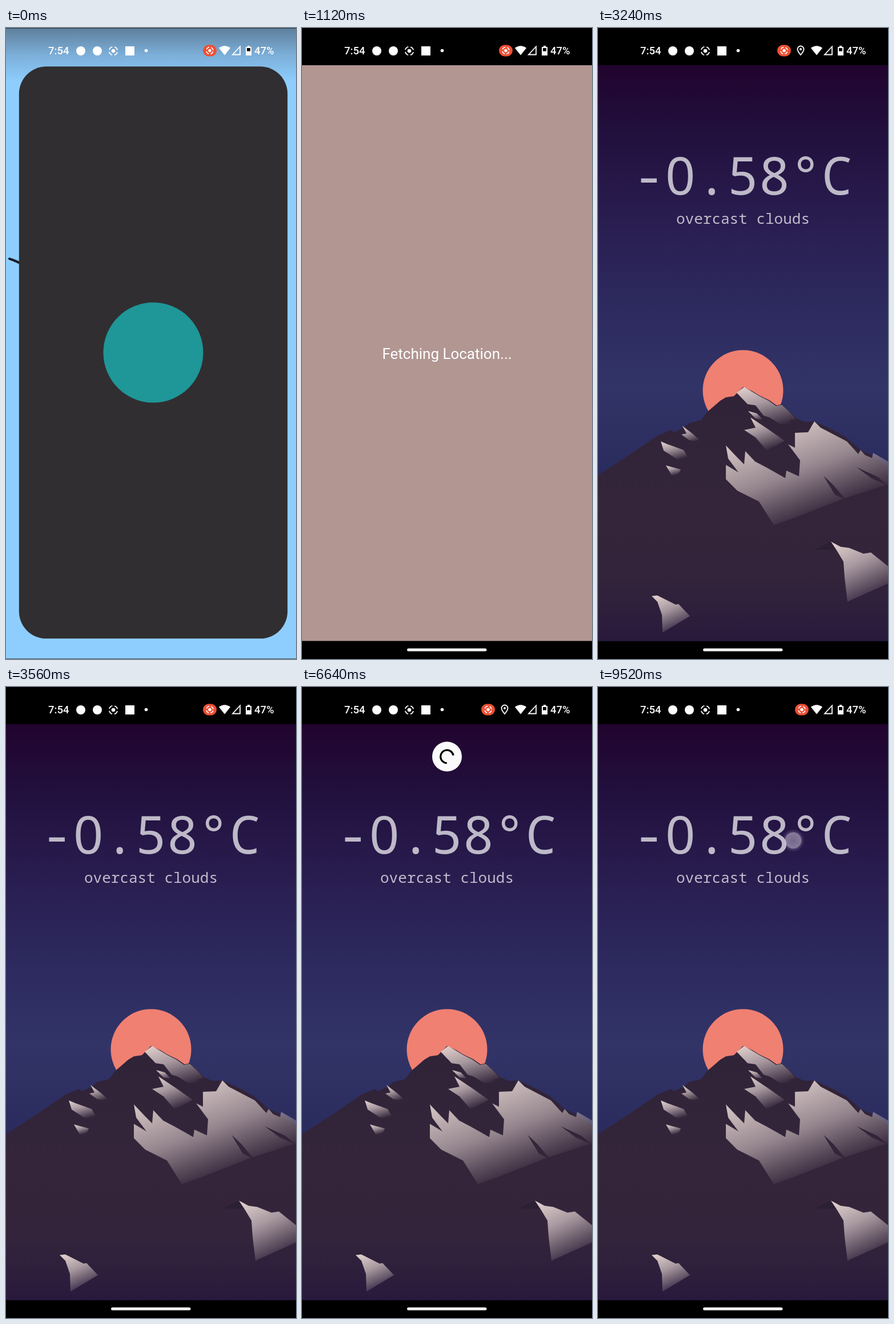
These frames come from a looping animation (508 by 1102 pixels, 9560 ms). An HTML page:

```html
<!DOCTYPE html>
<html lang="en">
<head>
<meta charset="utf-8">
<title>Weather app</title>
<style>
html, body { margin: 0; width: 100%; height: 100%; overflow: hidden; background: #000; }
svg { display: block; }
text { fill: #fff; font-family: Roboto, sans-serif; }
.mono { font-family: "Noto Sans Mono", monospace; fill-opacity: .7; }
.bar { font-size: 18.5px; font-weight: 500; }
.line { fill: none; stroke: #fff; stroke-width: 1.8; }
</style>
</head>
<body>
<svg width="508" height="1102" viewBox="0 0 508 1102">
  <defs>
    <linearGradient id="shade" x2="0" y2="1">
      <stop stop-color="#5f7f9c"/><stop offset=".5" stop-color="#7cafd9"/><stop offset="1" stop-color="#8eceff"/>
    </linearGradient>
    <linearGradient id="night" gradientUnits="userSpaceOnUse" x1="0" y1="65" x2="0" y2="790">
      <stop stop-color="#21042e"/><stop offset=".18" stop-color="#22113f"/>
      <stop offset=".4" stop-color="#2a1f52"/><stop offset=".6" stop-color="#2d2b60"/>
      <stop offset=".78" stop-color="#323467"/><stop offset="1" stop-color="#292b5d"/>
    </linearGradient>
    <linearGradient id="rock" gradientUnits="userSpaceOnUse" x1="0" y1="630" x2="0" y2="1070">
      <stop stop-color="#302337"/><stop offset=".45" stop-color="#34253a"/>
      <stop offset=".75" stop-color="#33243b"/><stop offset="1" stop-color="#291a3d"/>
    </linearGradient>
    <linearGradient id="snow" x1=".2" y1="0" x2=".65" y2="1">
      <stop stop-color="#dccbc8"/><stop offset=".4" stop-color="#a7989f"/>
      <stop offset="1" stop-color="#a7989f" stop-opacity="0"/>
    </linearGradient>
    <linearGradient id="face" gradientUnits="userSpaceOnUse" x1="330" y1="690" x2="390" y2="850">
      <stop stop-color="#d6c6c5"/><stop offset=".5" stop-color="#96878f"/>
      <stop offset="1" stop-color="#96878f" stop-opacity="0"/>
    </linearGradient>
    <radialGradient id="glow">
      <stop stop-color="#d5cbdc" stop-opacity=".45"/><stop offset=".68" stop-color="#d5cbdc" stop-opacity=".55"/>
      <stop offset=".74" stop-color="#c0b8e0" stop-opacity=".22"/><stop offset="1" stop-color="#c0b8e0" stop-opacity="0"/>
    </radialGradient>
    <clipPath id="page"><rect y="65" width="508" height="1005.5"/></clipPath>
    <g id="record">
      <circle r="7.3" class="line" stroke-dasharray="7.5 3.97" stroke-dashoffset="-2"/>
      <circle r="3.3" fill="#fff"/>
    </g>
  </defs>

  <g id="launch">
    <rect width="508" height="1102" fill="#8eceff"/>
    <rect width="508" height="95" fill="url(#shade)"/>
    <path d="M6 403Q16 406 40 418" fill="none" stroke="#1c1c22" stroke-width="4" stroke-linecap="round"/>
    <rect id="win" fill="#302e30"/>
    <circle id="icon" fill="#1f9698"/>
    <path d="M0 .5H508M0 1101.5H508" stroke="#111" stroke-opacity=".6"/>
  </g>

  <g id="fetch">
    <rect y="65" width="508" height="1005.5" fill="#b19692"/>
    <text x="254" y="578" font-size="26" text-anchor="middle">Fetching Location...</text>
  </g>

  <g id="weather">
    <g id="scene">
      <rect y="65" width="508" height="1005.5" fill="url(#night)"/>
      <circle cx="254" cy="633" r="70.5" fill="#ef8072"/>
      <path fill="url(#rock)" d="M0 781L60 742 104 712 128 702 133 706 148 699 160 690 180 685 192 670 214 651 224 645 238 643 247 634 254 627 270 634 283 642 300 650 313 659 322 657 334 668 347 681 362 688 378 687 390 692 410 701 435 715 460 737 478 745 508 765V1070.5H0Z"/>
      <path fill="#2b1f33" d="M380 911L408 897 416 911Z"/>
      <g fill="url(#snow)">
        <path d="M243 637L256 627 268 634 283 643 299 651 312 660 322 658 335 670 347 683 336 685 343 699 318 691 300 680 290 677 276 659 262 657Z"/>
        <path d="M263 669L278 673 291 686 276 682Z"/>
        <path d="M256 702L276 698 267 680 300 702 327 721 311 730 295 737 276 715Z"/>
        <path d="M110 722L122 727 150 737 160 754 140 754 115 738Z"/>
        <path d="M148 695L165 708 182 723 160 720 146 710 155 708Z"/>
        <path d="M119 764L145 771 140 781 129 781Z"/>
        <path d="M408 897L425 906 440 908 465 918 478 916 508 940V970L437 1002 432 960 430 932 418 912Z"/>
        <path d="M94 992L104 991 136 1007 141 1006 161 1027 113 1056 112 1025 104 1002Z"/>
      </g>
      <path fill="url(#face)" d="M379 687L390 698 436 722 456 744 460 737 468 746 480 751 482 742 508 757V797L430 822 340 857 308 868 282 827 244 808 224 788V763L246 776 228 752 224 729 242 748 256 762 258 739 275 757 296 768 328 786 330 773 352 783 354 755 333 727 345 733V707L368 706Z"/>
      <path fill="#34253a" d="M395 782L412 798 434 824 415 815ZM453 767L490 784 508 799 480 787Z"/>
    </g>
    <text class="mono" x="254" y="291" font-size="91.5" text-anchor="middle">-<tspan font-family="Noto Sans, sans-serif" dx="1.3">0</tspan><tspan dx="1.3">.58°C</tspan></text>
    <text class="mono" x="254" y="342" font-size="26" text-anchor="middle">overcast clouds</text>
  </g>

  <g clip-path="url(#page)">
    <g id="spinner">
      <circle r="26" fill="#fafafa"/>
      <path id="arc" fill="none" stroke="#000" stroke-width="3.2"/>
    </g>
  </g>
  <circle id="touch" r="20" fill="url(#glow)"/>

  <g id="status">
    <text class="bar" x="74" y="46">7:54</text>
    <g fill="#fff">
      <circle cx="131" cy="40" r="8"/>
      <circle cx="160" cy="40" r="8"/>
      <rect x="209" y="32" width="16" height="16"/>
      <circle cx="245.5" cy="39.5" r="2.8"/>
      <path d="M373 35Q383 27.500 393 35L383 47.500Z"/>
      <path d="M423 31h4v2h3v15h-10V33h3z"/>
    </g>
    <use href="#record" x="188" y="40"/>
    <g id="chip">
      <rect x="345" y="29.500" width="24" height="20" rx="10" fill="#ef5033"/>
      <use href="#record" transform="translate(357 39.500) scale(.82)"/>
    </g>
    <g id="pin">
      <path class="line" d="M355 47Q349.500 40.500 349.500 37A5.500 5.500 0 0 1 360.500 37Q360.500 40.500 355 47Z"/>
      <circle cx="355" cy="37" r="2" fill="#fff"/>
    </g>
    <path class="line" d="M410 32.500V46.500H397Z"/>
    <rect x="422" y="35" width="6" height="5.500" fill="#000"/>
    <text class="bar" x="435" y="46">47%</text>
  </g>
  <rect id="pill" x="184" y="1083.500" width="139.500" height="5" rx="2.500"/>
</svg>
<script>
const LOOP = 9560, PULL = 4640, RELEASE = 5600, SPIN = 5840, DONE = 7250;
const REACH = 83, CYCLE = 1332;
const el = id => document.getElementById(id);
const set = (id, attrs) => { for (const k in attrs) el(id).setAttribute(k, attrs[k]); };
const show = (id, on) => { el(id).style.display = on ? "" : "none"; };
const ramp = (t, from, to) => Math.min(1, Math.max(0, (t - from) / (to - from)));
const smooth = x => x * x * (3 - 2 * x);
const mix = (a, b, k) => a + (b - a) * k;
const within = (t, from, to) => t >= from && t < to;

function arcPath(start, sweep, r = 11.3) {
  const point = deg => {
    const a = deg * Math.PI / 180;
    return `${r * Math.cos(a)} ${r * Math.sin(a)}`;
  };
  return `M${point(start)}A${r} ${r} 0 ${sweep > 180 ? 1 : 0} 1 ${point(start + sweep)}`;
}

const dragAt = t => 350 * smooth(ramp(t, 4680, 5430));

// Pull-to-refresh with resistance past its resting distance
function pullAt(t) {
  const over = Math.max(0, dragAt(t) - 12) / 2;
  const part = Math.min(1, over / REACH);
  const q = Math.min(2, Math.max(0, over - REACH) / REACH) / 4;
  const tension = (q - q * q) * 2;
  const adjusted = Math.max(part - .4, 0) * 5 / 3;
  return {
    y: 39 + REACH * (part + 2 * tension),
    start: 85 + 180 * (-.25 + .4 * adjusted + 2 * tension),
    sweep: Math.max(.1, 288 * adjusted)
  };
}

function spinAt(t) {
  const turns = (t - SPIN) / CYCLE, n = Math.floor(turns), p = turns - n;
  const grow = smooth(ramp(p, 0, .5)), shrink = smooth(ramp(p, .5, 1));
  return {
    start: -69 + 216 * turns + 284 * (n + shrink),
    sweep: 4 + 284 * (grow - shrink)
  };
}

function drawSpinner(t) {
  const on = within(t, PULL, DONE + 150);
  show("spinner", on);
  if (!on) return;
  const pull = pullAt(Math.min(t, RELEASE));
  const ring = t < SPIN ? pull : spinAt(t);
  const y = mix(pull.y, 121.5, smooth(ramp(t, RELEASE, RELEASE + 200)));
  const size = 1 - ramp(t, DONE, DONE + 150);
  set("spinner", { transform: `translate(254 ${y}) scale(${size})` });
  set("arc", { d: arcPath(ring.start, ring.sweep), "stroke-opacity": mix(.33, 1, ramp(t, 5050, 5350)) });
}

function drawLaunch(t) {
  show("launch", t < 900);
  const k = 1 - (1 - ramp(t, 0, 320)) ** 3;
  set("win", {
    x: mix(23, 0, k), y: mix(68, 0, k),
    width: mix(470, 508, k), height: mix(998, 1102, k), rx: mix(48, 0, k)
  });
  set("icon", { cx: mix(258, 254, k), cy: mix(567, 550.5, k), r: mix(87.5, 89.5, k) });
}

function drawTouch(t) {
  const first = within(t, PULL, RELEASE);
  show("touch", first || t >= 9400);
  set("touch", first ? { cx: 334, cy: 674 + dragAt(t) } : { cx: 342, cy: 268 });
}

function draw(t) {
  drawLaunch(t);
  show("fetch", within(t, 1120, 2880));
  show("weather", t >= 2880);
  el("scene").style.opacity = ramp(t, 2840, 3160);
  drawSpinner(t);
  drawTouch(t);
  const locating = within(t, 1400, 3400) || within(t, 5920, 7440);
  show("pin", locating);
  set("chip", { transform: `translate(${locating ? -31 : 0} 0)` });
  set("pill", { fill: t < 1120 ? "#8b8187" : "#f6f3f4", "fill-opacity": ramp(t, 200, 360) });
}

function tick() {
  draw(performance.now() % LOOP);
  requestAnimationFrame(tick);
}
tick();
</script>
</body>
</html>
```
